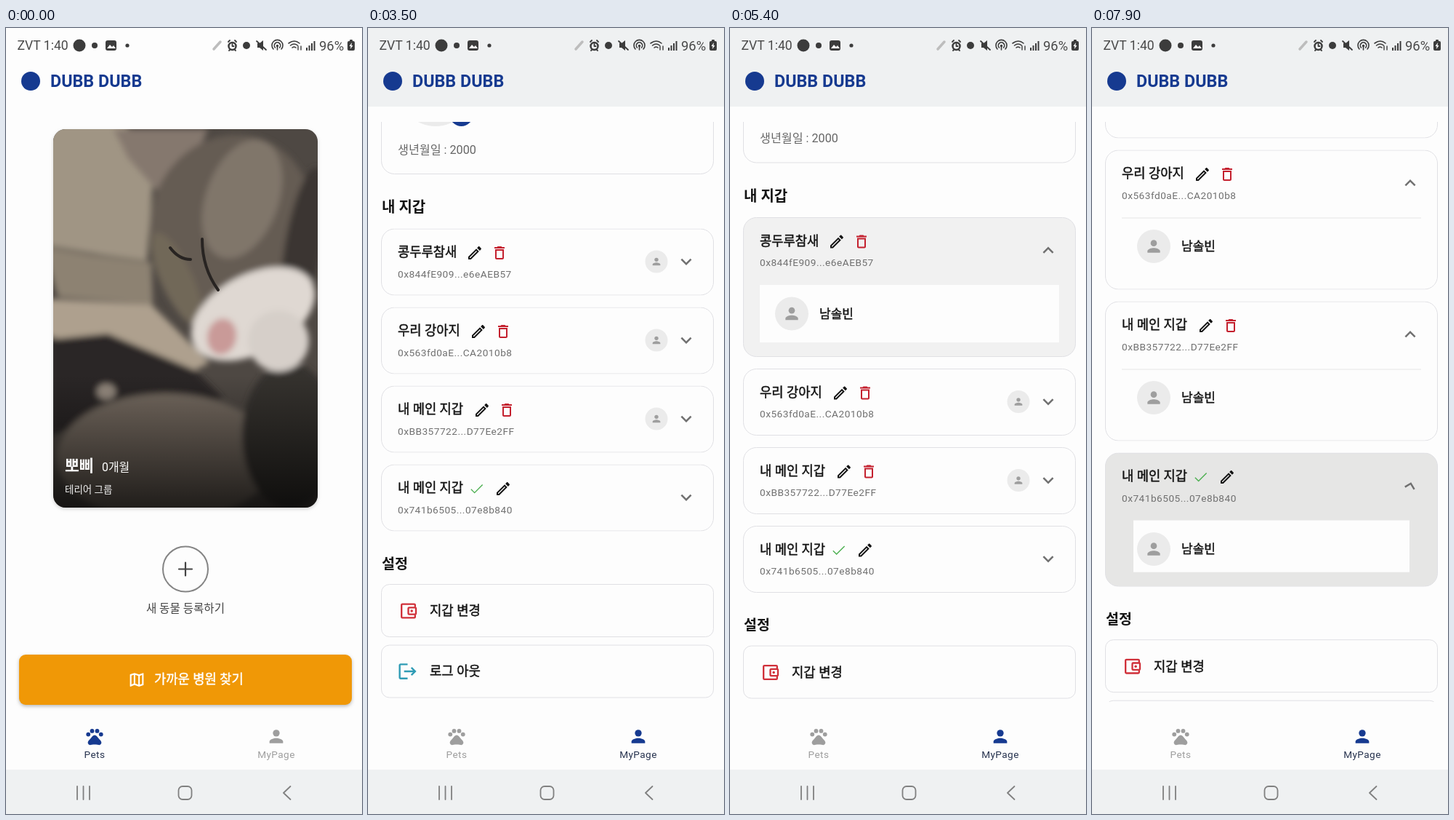
An HTML page for the animation above (8 s loop, 490x1080 px).

```html
<!DOCTYPE html>
<html lang="ko">
<head>
<meta charset="utf-8">
<style>
  html, body { margin: 0; width: 100%; height: 100%; overflow: hidden; background: #fdfdfd; }
  svg { display: block; font-family: Roboto, "Noto Sans CJK KR", "Noto Sans CJK", sans-serif; }
  #stage { width: 100%; height: 100%; }
  .line { fill: none; stroke-linecap: round; stroke-linejoin: round; }
</style>
</head>
<body>
<svg id="stage" viewBox="0 0 490 1080" xmlns="http://www.w3.org/2000/svg"></svg>
<script>
const BG = '#fdfdfd', TINT = '#eff1f2', NAVY = '#163a90', INK = '#141414', SOFT = '#707070',
      MUTED = '#9e9e9e', EDGE = '#e0e0e4', AVATAR = '#ebebeb', RED = '#c4202e';
const DURATION = 8000, STEP = 100;

const ICONS = {
  paw: '<circle cx="4.5" cy="9.5" r="2.5"/><circle cx="9" cy="5.5" r="2.5"/><circle cx="15" cy="5.5" r="2.5"/><circle cx="19.5" cy="9.5" r="2.5"/><path d="M17.3 14.9L14.9 12C13.1 10 10.9 10 9.1 12L6.7 14.9C5.3 16.2 3.7 17.6 4 19.7C4.3 20.7 5 21.7 6.4 22C7.2 22.1 9.5 21.5 12 21.5S16.8 22.1 17.6 22C19 21.7 19.7 20.7 20 19.7C20.3 17.6 18.7 16.2 17.3 14.9z"/>',
  person: '<circle cx="12" cy="8" r="4"/><path d="M12 14c-2.67 0-8 1.34-8 4v2h16v-2c0-2.66-5.33-4-8-4z"/>',
  edit: '<path d="M14.06 9.02l.92.92L5.92 19H5v-.92l9.06-9.06M17.66 3c-.25 0-.51.1-.7.29l-1.83 1.83 3.75 3.75 1.83-1.83c.39-.39.39-1.02 0-1.41l-2.34-2.34c-.2-.2-.45-.29-.71-.29zm-3.6 3.19L3 17.25V21h3.75L17.81 9.94z"/>',
  trash: '<path d="M6 19c0 1.1.9 2 2 2h8c1.1 0 2-.9 2-2V7H6zM8 9h8v10H8zM15.5 4l-1-1h-5l-1 1H5v2h14V4z"/>',
  camera: '<circle cx="12" cy="12" r="3.2"/><path d="M9 2L7.17 4H4c-1.1 0-2 .9-2 2v12c0 1.1.9 2 2 2h16c1.1 0 2-.9 2-2V6c0-1.1-.9-2-2-2h-3.17L15 2zM12 17a5 5 0 1 1 0-10a5 5 0 0 1 0 10z"/>',
  more: '<path d="M16.59 8.59L12 13.17 7.41 8.59 6 10l6 6 6-6z"/>',
  check: '<path d="M9 16.8L4.5 12.3l-1 1L9 18.8 21 6.8l-1-1z"/>',
  logout: '<path d="M17 7l-1.41 1.41L18.17 11H8v2h10.17l-2.58 2.58L17 17l5-5zM4 5h8V3H4c-1.1 0-2 .9-2 2v14c0 1.1.9 2 2 2h8v-2H4z"/>',
  map: '<path d="M20.5 3L15 5.1 9 3 3.36 4.9Q3 5 3 5.4V20.5q0 .5.6.5L9 18.9l6 2.1 5.64-1.9q.36-.1.36-.5V3.5q0-.5-.5-.5zM10 5.47l4 1.4v11.66l-4-1.4zM5 6.46l3-1.01v11.7l-3 1.16zM19 17.54l-3 1.01V6.86l3-1.16z"/>',
  wallet: '<path d="M5 3h14q2 0 2 2v2.5h-2V5H5v14h14v-2.5h2V19q0 2-2 2H5q-2 0-2-2V5q0-2 2-2z"/><path d="M13 7h7q2 0 2 2v6q0 2-2 2h-7q-2 0-2-2V9q0-2 2-2zM13 9v6h7V9z"/><circle cx="16" cy="12" r="1.5"/>'
};

const icon = (name, x, y, size, color) =>
  `<g fill="${color}" fill-rule="evenodd" transform="translate(${x} ${y}) scale(${size / 24}) translate(-12 -12)">${ICONS[name]}</g>`;
const text = (s, x, y, size, color, extra = '') =>
  `<text x="${x}" y="${y + size * .36}" font-size="${size}" fill="${color}" ${extra}>${s}</text>`;
// Medium weight: regular glyphs with a hairline outline
const medium = (s, x, y, size, color) => text(s, x, y, size, color, `stroke="${color}" stroke-width=".45"`);
const rect = (x, y, w, h, r, fill, extra = '') =>
  `<rect x="${x}" y="${y}" width="${w}" height="${h}" rx="${r}" fill="${fill}" ${extra}/>`;
const dot = (x, y, r, fill, extra = '') => `<circle cx="${x}" cy="${y}" r="${r}" fill="${fill}" ${extra}/>`;
const line = (d, color, w) => `<path class="line" d="${d}" stroke="${color}" stroke-width="${w}"/>`;
const avatar = (x, y, r, size, extra = '') =>
  `<g ${extra}>${dot(x, y, r, AVATAR)}${icon('person', x, y, size, MUTED)}</g>`;
const frame = (y, h, r = 18) => rect(18.5, y, 457, h, r, BG, `stroke="${EDGE}"`);
const BOLD = 'font-weight="700"', MID = 'text-anchor="middle"';

const OWNER = '남솔빈';
const WALLETS = [
  { name: '콩두루참새', hash: '0x844fE909...e6eAEB57', edit: 147, tap: 5000 },
  { name: '우리 강아지', hash: '0x563fd0aE...CA2010b8', edit: 152, tap: 5750 },
  { name: '내 메인 지갑', hash: '0xBB357722...D77Ee2FF', edit: 157, tap: 6372 },
  { name: '내 메인 지갑', hash: '0x741b6505...07e8b840', edit: 186, tap: 7708, main: true }
];

function statusBar() {
  const c = '#3c3c3c';
  let s = text('ZVT 1:40', 15.5, 24, 17.6, '#4a4a4a') + text('96%', 431, 24, 18.4, '#4a4a4a');
  s += dot(101, 24, 8.5, c) + dot(122, 24, 4, c) + dot(167, 24, 2.6, c) + dot(331, 24, 5, c);
  s += rect(137, 17, 15, 14, 3, c) + `<path d="M139 28l4-5 3 3 2-2 3 4z" fill="${BG}"/>`;
  s += line('M286 29l9-10', '#bdbdbd', 3.5);
  s += dot(311.5, 25, 5, 'none', `stroke="${c}" stroke-width="2.5"`) + line('M306 19l2-2M317 19l-2-2M311.5 22v3h2M307 31l1-1M316 31l-1-1', c, 1.8);
  s += `<path d="M346 21h3l5-4v14l-5-4h-3z" fill="${c}"/>` + line('M345 18l13 12', c, 1.8);
  s += line('M368 29a7.5 7.5 0 1 1 11 0M370.5 27a4.2 4.2 0 1 1 6 0', c, 1.6) + dot(373.5, 24.5, 1.7, c) + line('M373.5 26v4', c, 1.6);
  s += line('M389 21q8-6 15 0M391.5 24q5-4 10 0M394 27q2.5-2 5 0', c, 1.6) + line('M402 25v5M406 30v-5', c, 1.4);
  s += [0, 1, 2, 3].map(i => rect(413 + i * 3.5, 27 - i * 3, 2, 4 + i * 3, 0, c)).join('');
  return s + rect(470, 18, 10, 13, 2, c) + rect(473, 16, 4, 3, 1, c) + `<path d="M476 20l-3.5 5h2l-.5 4 3.5-5h-2z" fill="${BG}"/>`;
}

function photo() {
  const blob = (x, y, rx, ry, a, fill) =>
    `<ellipse cx="${x}" cy="${y}" rx="${rx}" ry="${ry}" fill="${fill}" transform="rotate(${a} ${x} ${y})"/>`;
  return `<g clip-path="url(#photoClip)">${rect(65, 139, 364, 520, 0, '#4e4843')}<g filter="url(#soft)">
    <path d="M50 120h110l42 90-8 110-60-8-84-14z" fill="#a09584"/>
    <path d="M50 300l70 12 80 10 2 58-130-10z" fill="#8d8272"/>
    <path d="M50 372l150 8 80 80-40 20-190-60z" fill="#aea08e"/>
    <path d="M148 139l20 40 40 45 50-40 20-45z" fill="#85786e"/>
    <path d="M60 428l80-8 120 50 40 40-110 10-130 40z" fill="#2a2727"/>
    ${blob(310, 265, 110, 120, 25, '#655c52')}${blob(325, 235, 50, 85, 20, '#80766a')}
    ${blob(235, 345, 22, 70, -25, '#716759')}${blob(409, 300, 25, 110, 10, '#3a3532')}
    ${blob(220, 590, 150, 88, 0, '#756b60')}${blob(390, 560, 65, 100, 0, '#36322f')}
    ${blob(340, 393, 92, 54, -28, '#dfd8d2')}${blob(375, 430, 42, 42, 0, '#d6cfc9')}
    ${blob(138, 500, 13, 11, 0, '#968b80')}${blob(297, 424, 20, 25, 10, '#c99a98')}
  </g>${line('M226 302q12 16 28 16M270 290q0 40 22 70', '#282422', 4)}${rect(65, 139, 364, 520, 0, 'url(#shade)')}</g>`;
}

function home() {
  return `<g id="home">${rect(65, 141, 364, 520, 17, '#d2d2d2', 'filter="url(#drop)"')}${photo()}
    ${text('뽀삐', 81, 601, 21.5, '#fff', BOLD)}${text('0개월', 132, 603, 15.9, '#fff')}${text('테리어 그룹', 81, 634, 13.5, '#eee')}
    ${dot(247, 743.5, 31, BG, 'stroke="#858585" stroke-width="2"')}${line('M238 743.5h18M247 734.5v18', '#444', 2.2)}
    ${text('새 동물 등록하기', 247, 797, 15.6, '#444', MID)}
    ${rect(18, 863, 458, 69, 9, '#b8b8b8', 'filter="url(#drop)"')}${rect(18, 861, 458, 69, 9, '#f09806')}
    ${icon('map', 180, 895.5, 25, '#fff')}${medium('가까운 병원 찾기', 204, 895, 17.7, '#fff')}</g>`;
}

function wallet(w, i) {
  return `<svg id="w${i}" width="490" height="92">
    <rect class="box" x="18.5" y=".5" width="457" height="91" rx="18" fill="${BG}"/>
    <rect class="splash" x="18.5" y=".5" width="457" height="91" rx="18" fill="#e6e6e5"/>
    <g class="body"><rect class="panel" y="93" fill="${BG}"/>
      <path class="rule" d="M41 93.5H453" stroke="#e6e6e6"/>
      ${avatar(85, 132.5, 23, 26)}${medium(OWNER, 123, 132.5, 17, INK)}</g>
    <rect class="box" x="18.5" y=".5" width="457" height="91" rx="18" fill="none" stroke="${EDGE}"/>
    ${medium(w.name, 41, 32.5, 17.7, INK)}${text(w.hash, 41, 62.5, 13.7, SOFT, 'letter-spacing=".47"')}
    ${icon('edit', w.edit, 33.5, 24, INK)}
    ${w.main ? icon('check', 149.5, 33.5, 23, '#4caf50') : icon('trash', w.edit + 34, 33.5, 24, RED) + avatar(397, 45.5, 15.5, 16, 'class="mini"')}
    <g class="arrow">${icon('more', 438, 45.5, 30, '#707070')}</g></svg>`;
}

function myPage() {
  return `<g id="my" clip-path="url(#view)"><g id="scroll">
    ${text('마이페이지', 19, 149, 26.3, INK, BOLD)}
    ${frame(201.5, 191)}${avatar(93, 275, 52, 52)}${dot(128.5, 311, 16, NAVY)}${icon('camera', 128.5, 311, 20, BG)}
    ${text(OWNER, 165, 260.5, 20, INK, BOLD)}${text('4817093@zuvel.com', 165, 292, 16.2, SOFT, 'letter-spacing=".3"')}
    ${text('생년월일 : 2000', 41, 359, 16.2, '#666')}
    ${text('내 지갑', 19, 438, 20, INK, BOLD)}
    ${WALLETS.map(wallet).join('')}
    <g id="settings">${text('설정', 19, 927.5, 19.5, INK, BOLD)}
      ${frame(956.5, 72, 11)}${icon('wallet', 55.5, 993, 28, '#d0303a')}${medium('지갑 변경', 85, 993, 17.8, INK)}
      ${frame(1040, 72, 11)}${icon('logout', 54.5, 1076, 29, '#2f9cb5')}${medium('로그 아웃', 85, 1076, 17.8, INK)}</g>
  </g></g>`;
}

const tab = (id, glyph, label, x) => {
  const part = (state, c, t) => `<g id="${id}${state}">${icon(glyph, x, 973.5, 28, c)}${text(label, x, 998, 13.6, t, MID + ' letter-spacing=".45"')}</g>`;
  return part('On', NAVY, '#26324e') + part('Off', MUTED, MUTED);
};

const stage = document.getElementById('stage');
stage.innerHTML = `<defs>
    <clipPath id="view"><rect y="129" width="490" height="797"/></clipPath>
    <clipPath id="tabClip"><rect y="947" width="490" height="72"/></clipPath>
    <clipPath id="photoClip"><rect x="65" y="139" width="364" height="520" rx="17"/></clipPath>
    <filter id="soft"><feGaussianBlur stdDeviation="4"/></filter>
    <filter id="drop" x="-10%" y="-20%" width="120%" height="140%"><feGaussianBlur stdDeviation="2.5"/></filter>
    <linearGradient id="shade" x2="0" y2="1"><stop offset=".65" stop-opacity="0"/><stop offset="1" stop-opacity=".72"/></linearGradient>
    <radialGradient id="ink"><stop offset=".8" stop-color="#eeeff1"/><stop offset="1" stop-color="#eeeff1" stop-opacity="0"/></radialGradient>
  </defs>
  ${rect(0, 0, 490, 1080, 0, BG)}${home()}${myPage()}
  ${rect(0, 0, 490, 108, 0, TINT, 'id="header"')}${statusBar()}
  ${dot(34, 73, 13, NAVY)}${text('DUBB DUBB', 61, 73, 23.3, NAVY, BOLD)}
  <g clip-path="url(#tabClip)">${dot(372, 983, 0, 'url(#ink)', 'id="ripple"')}</g>
  ${tab('pets', 'paw', 'Pets', 122)}${tab('me', 'person', 'MyPage', 372)}
  ${rect(0, 1019, 490, 61, 0, TINT)}
  ${line('M98 1042v18M106.5 1042v18M115 1042v18M391.5 1042l-9.5 9 9.5 9', '#808080', 1.8)}
  ${rect(237.5, 1042, 18, 18, 5.5, 'none', 'stroke="#808080" stroke-width="1.8"')}`;

const $ = id => document.getElementById(id);
const clamp = x => Math.min(1, Math.max(0, x));
const span = (t, a, b) => clamp((t - a) / (b - a));
const easeOut = u => 1 - (1 - u) ** 2;
const show = (el, on) => { el.style.display = on ? '' : 'none'; };
const attr = (el, o) => { for (const k in o) el.setAttribute(k, o[k]); };

const cards = WALLETS.map((w, i) => {
  const el = $('w' + i), q = c => el.querySelector('.' + c);
  return { el, tap: w.tap, boxes: el.querySelectorAll('.box, .splash'), splash: q('splash'), body: q('body'),
           panel: q('panel'), rule: q('rule'), mini: q('mini'), arrow: q('arrow') };
});

function drawCard(c, t, y) {
  const open = span(t, c.tap, c.tap + 200) ** 2, h = 92 + 100 * open;
  const inset = open < 1 ? 16 : 0;
  const glow = span(t, c.tap, c.tap + 190) ** 2 * (1 - span(t, c.tap + 200, c.tap + 600));
  attr(c.el, { y, height: h });
  c.boxes.forEach(b => attr(b, { height: h - 1 }));
  attr(c.splash, { opacity: glow });
  attr(c.panel, { x: 41 + inset, width: 412 - 2 * inset, height: Math.max(0, 100 * open - 21) });
  show(c.body, open > .1);
  show(c.rule, glow === 0);
  if (c.mini) show(c.mini, open === 0);
  attr(c.arrow, { transform: `rotate(${-180 * open} 438 45.5)` });
  return h;
}

function draw(t) {
  const my = t >= 900;
  show($('home'), !my);
  show($('my'), my);
  show($('petsOn'), !my);
  show($('petsOff'), my);
  show($('meOn'), my);
  show($('meOff'), !my);

  attr($('ripple'), { r: 390 * easeOut(span(t, 800, 1200)), opacity: 1 - span(t, 1200, 1500) });

  const scroll = 35 * span(t, 2650, 2800) + 172.5 * easeOut(span(t, 2800, 3800)) + 300.5 * easeOut(span(t, 6900, 7500));
  const stretch = 1 + .015 * span(t, 3700, 3900) * (1 - span(t, 3900, 4500)) ** 1.6;
  attr($('scroll'), { transform: `translate(0 926) scale(1 ${stretch}) translate(0 ${-926 - scroll})` });
  show($('header'), scroll > 0);

  let y = 467.5;
  for (const c of cards) y += drawCard(c, t, y) + 16;
  attr($('settings'), { transform: `translate(0 ${y - 899.5})` });
}

function tick(now) {
  draw(Math.floor(now % DURATION / STEP) * STEP);
  requestAnimationFrame(tick);
}
draw(0);
requestAnimationFrame(tick);
</script>
</body>
</html>
```
